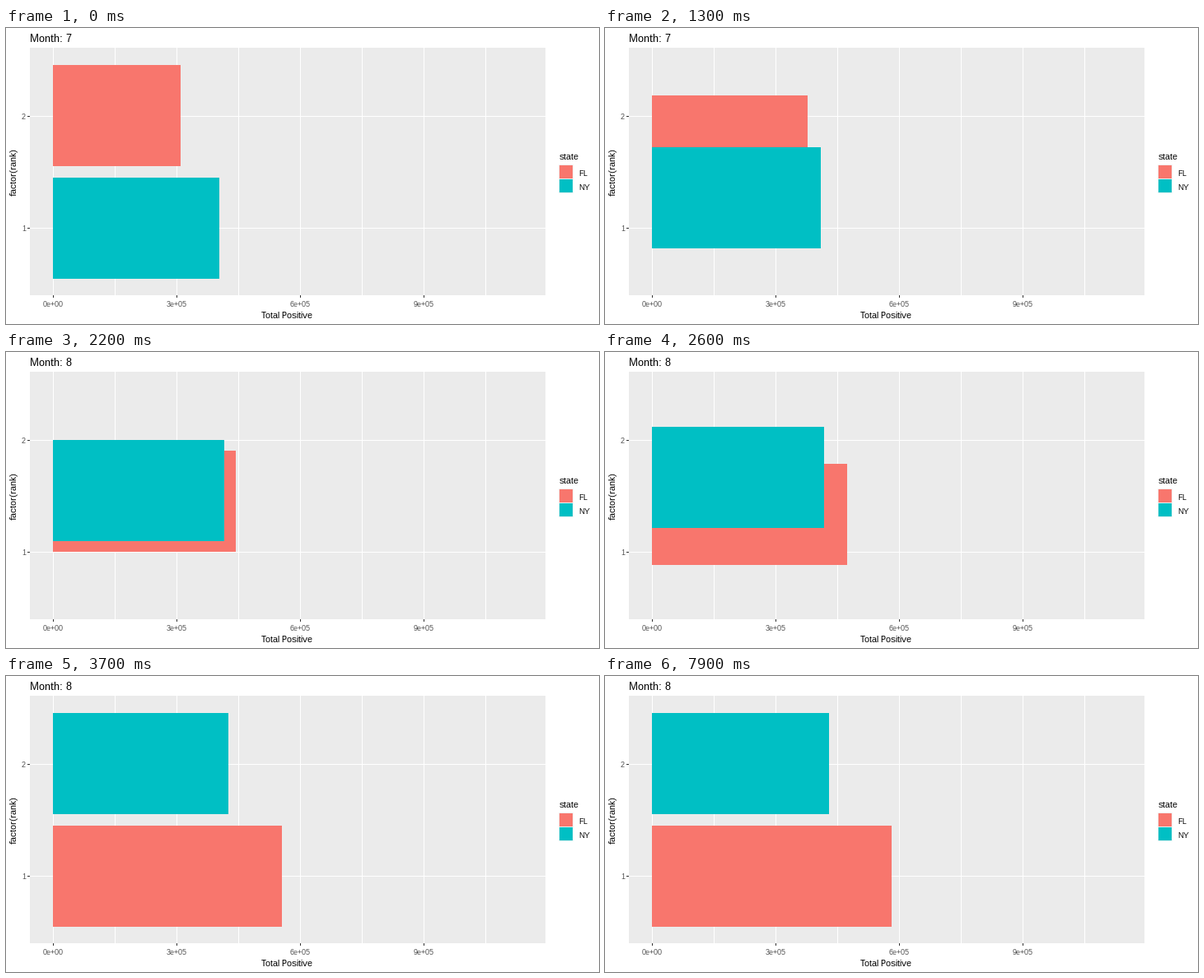
Write a matplotlib script that moves like this. It is 720 px wide and 360 px high and loops after 8 s.

```python
import matplotlib.pyplot as plt
from matplotlib.animation import FuncAnimation
from matplotlib.patches import Rectangle

plt.rcParams["font.family"] = "Liberation Sans"
plt.rcParams["text.hinting"] = "default"
plt.rcParams["text.hinting_factor"] = 1

W, H, DPI = 720, 360, 72  # at 72 dpi one point is one pixel
FRAMES, INTERVAL = 80, 100
RED, TEAL = "#F8766D", "#00BFC4"
PANEL, KEY, TICK, TICK_TEXT = "#EBEBEB", "#F2F2F2", "#333333", "#4D4D4D"

X0, BAR_H = 57, 123
UPPER, LOWER = 45, 182            # bar tops for rank 2 and rank 1
SWAP_START, SWAP_STEPS = 4, 33    # the ranks change places
GROW_START = 71                   # then both bars grow again

fig = plt.figure(figsize=(W / DPI, H / DPI), dpi=DPI, facecolor="white")
ax = fig.add_axes([0, 0, 1, 1])
ax.set_xlim(0, W)
ax.set_ylim(H, 0)
ax.axis("off")


def rect(x, y, w, h, color, z=1):
    patch = Rectangle((x, y), w, h, facecolor=color, linewidth=0,
                      antialiased=False, zorder=z)
    return ax.add_patch(patch)


def label(x, y, s, size, color="black", ha="left", **kw):
    kw.setdefault("va", "baseline")
    return ax.text(x, y, s, fontsize=size, color=color, ha=ha, **kw)


# panel, grid and axes
rect(29, 24, 626, 301, PANEL)
for x in range(132, 600, 150):
    rect(x, 24, 1, 301, "white")
for i, name in enumerate(["0e+00", "3e+05", "6e+05", "9e+05"]):
    x = X0 + 150 * i
    rect(x, 24, 1, 301, "white")
    rect(x, 325, 1, 3, TICK)
    label(x, 339, name, 9, TICK_TEXT, "center")
for y, name in [(107, "2"), (243, "1")]:
    rect(29, y, 626, 1, "white")
    rect(26, y, 3, 1, TICK)
    label(24, y + 4, name, 9, TICK_TEXT, "right")
label(341.5, 353, "Total Positive", 11, ha="center")
label(15, 174.5, "factor(rank)", 11, ha="right", va="center", rotation=90)

# legend
label(672, 160, "state", 11)
rect(671, 166, 18, 35, KEY)
for y, color, name in [(167, RED, "FL"), (184, TEAL, "NY")]:
    rect(672, y, 16, 16, color)
    label(695, y + 13, name, 9)

title = label(29, 17, "", 13)
fl = rect(X0, UPPER, 1, BAR_H, RED, 3)
ny = rect(X0, LOWER, 1, BAR_H, TEAL, 4)


def mix(a, b, t):
    return a + (b - a) * t


def place(bar, right, top):
    bar.set_width(round(right) - X0)
    bar.set_y(round(top))


def draw(i):
    t = min(max((i - SWAP_START) / SWAP_STEPS, 0), 1)
    grow = max(i - GROW_START, 0)
    place(fl, mix(212, 334.9, t) + 1.63 * grow, mix(UPPER, LOWER, t))
    place(ny, mix(259.3, 269.6, t) + 0.3 * grow, mix(LOWER, UPPER, t))
    title.set_text("Month: 7" if t < 0.5 else "Month: 8")
    return fl, ny, title


anim = FuncAnimation(fig, draw, frames=FRAMES, interval=INTERVAL,
                     init_func=lambda: draw(0), repeat=True, repeat_delay=0)
plt.show()
```
